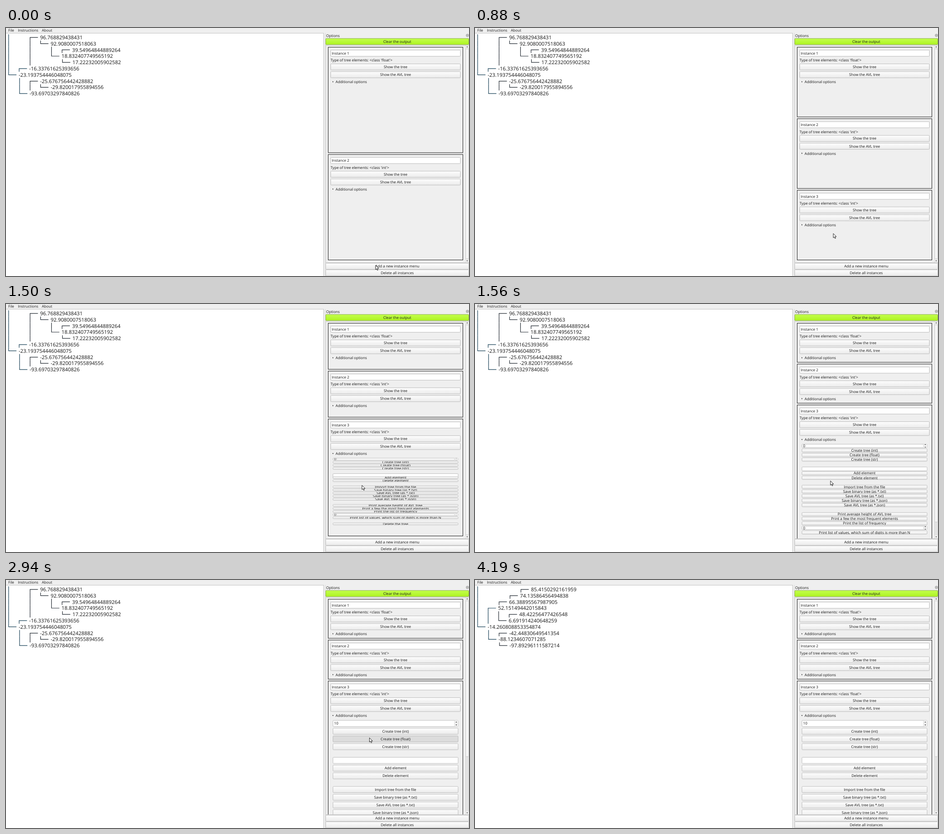
Recreate the animation shown at these times as an HTML page with a canvas. Size 1021x549 px, loop 4.25 s.

```html
<!DOCTYPE html>
<html lang="en">
<head>
<meta charset="utf-8">
<title>Tree builder</title>
<style>
html, body { margin: 0; width: 100%; height: 100%; overflow: hidden; background: #efefef; }
canvas { display: block; }
</style>
</head>
<body>
<canvas id="stage" width="1021" height="549"></canvas>
<script>
const ctx = document.getElementById('stage').getContext('2d');
const LOOP = 4250;
const FACE = '"Open Sans", "Noto Sans", sans-serif';
const BG = '#efefef', INK = '#161616', EDGE = '#b6b6b6';

const TICKS = [0, 250, 440, 500, 560, 630, 690, 750, 810, 870, 940, 1000, 1060,
  1310, 1380, 1440, 1500, 1560, 1630, 1690, 2940, 3380, 3810, 4190];

// Pointer positions: time, x, y
const PATH = [[0, 814.5, 525], [440, 814.5, 525], [750, 796, 466], [1060, 779.5, 436.5],
  [1310, 779.5, 436.5], [1380, 782, 429], [1500, 784.5, 401], [1690, 781, 370],
  [2940, 801, 349], [3380, 294, 83.5], [3810, 58, -3.5], [4190, 58, -20]];

const FIRST_TREE = [
  '│ ┌96.768829438431',
  '│ │└92.9080007518063',
  '│ │ │┌39.54964844889264',
  '│ │ └18.832407749565192',
  '│ │  └17.22232005902582',
  '│┌-16.33761625393656',
  '└-23.193754446048075',
  ' │┌-25.676756442428882',
  ' ││└-29.820017955894556',
  ' └-93.69703297840826'];

const NEW_TREE = [
  '│   ┌85.4150292161959',
  '│  ┌74.13586456494838',
  '│ ┌66.38895567987905',
  '│┌52.15149442015843',
  '│││┌48.42256477426548',
  '││└6.691914240648259',
  '└-14.260808853354874',
  ' │┌-42.44830649541354',
  ' └-88.1234607071285',
  '  └-97.89296111587214'];

const OPTIONS = ['#spin', 'Create tree (int)', 'Create tree (float)', 'Create tree (str)', '',
  '#edit', 'Add element', 'Delete element', '',
  'Import tree from the file', 'Save binary tree (as *.txt)', 'Save AVL tree (as *.txt)',
  'Save binary tree (as *.json)', 'Save AVL tree (as *.json)', '',
  'Print average height of AVL tree', 'Print a few the most frequent elements',
  'Print the list of frequency', '#spin',
  'Print list of values, which sum of digits is more than N', '', 'Delete the tree'];

function rect(x, y, w, h, color) {
  ctx.fillStyle = color;
  ctx.fillRect(x, y, w, h);
}

function text(str, x, cy, align = 'left', size = 8.1) {
  ctx.font = `${size}px ${FACE}`;
  ctx.textAlign = align;
  ctx.fillStyle = INK;
  ctx.fillText(str, x, cy + size * 0.36);
}

function poly(points, fill, stroke) {
  ctx.beginPath();
  points.forEach(([x, y]) => ctx.lineTo(x, y));
  ctx.closePath();
  ctx.fillStyle = fill;
  ctx.fill();
  if (stroke) {
    ctx.strokeStyle = stroke;
    ctx.lineWidth = 0.9;
    ctx.stroke();
  }
}

function triangle(x, y, dx, dy) {
  const r = 1.6;
  poly([[x + dx * r, y + dy * r], [x - dx + dy * r, y - dy + dx * r],
    [x - dx - dy * r, y - dy - dx * r]], '#484848');
}

function clipped(x, y, w, h, paint) {
  ctx.save();
  ctx.beginPath();
  ctx.rect(x, y, w, h);
  ctx.clip();
  paint();
  ctx.restore();
}

function box(x, y, w, h, fill, edge = EDGE) {
  ctx.beginPath();
  ctx.roundRect(x, y, w, h, Math.min(1.5, h / 2));
  ctx.fillStyle = fill;
  ctx.fill();
  ctx.strokeStyle = edge;
  ctx.lineWidth = 0.9;
  ctx.stroke();
}

function button(label, x, cy, w, { h = 13.6, down = false, green = false } = {}) {
  const y = cy - h / 2;
  let fill = '#dcdcdc';
  if (!down) {
    fill = ctx.createLinearGradient(0, y, 0, y + h);
    fill.addColorStop(0, green ? '#c3ff4c' : '#fdfdfd');
    fill.addColorStop(1, green ? '#aef322' : '#ebebeb');
  }
  box(x, y, w, h, fill, green ? '#83a83c' : EDGE);
  clipped(x, y, w, h, () => text(label, x + w / 2, cy, 'center'));
}

function drawTree(rows) {
  const pitch = 13.82;
  ctx.lineWidth = 1.2;
  rows.forEach((row, i) => {
    const cy = 20.8 + i * pitch, top = cy - pitch / 2, bottom = cy + pitch / 2;
    let x = 5.8;
    for (const [k, c] of [...row].entries()) {
      if (!'│┌└ '.includes(c)) {
        text(row.slice(k), x - 1.9, cy, 'left', 11.35);
        break;
      }
      ctx.strokeStyle = k < 2 ? '#163f55' : '#202830';
      ctx.beginPath();
      if (c === '│') {
        ctx.moveTo(x, top);
        ctx.lineTo(x, bottom);
      } else if (c !== ' ') {
        ctx.moveTo(x, c === '┌' ? bottom : top);
        ctx.lineTo(x, cy);
        ctx.lineTo(x + 17.3, cy);
      }
      ctx.stroke();
      x += c === ' ' ? 24.1 : c === '│' ? 23.2 : 24;
    }
  });
}

function drawSpin(cy, h, value) {
  const y = cy - h / 2;
  box(721, y, 276, h, '#fff');
  clipped(721, y, 276, h, () => {
    rect(989, y, 7.6, h, '#f3f3f3');
    rect(988.6, y, 0.8, h, '#cfcfcf');
    text(value, 723.5, cy);
    triangle(993, cy - 3, 0, -1);
    triangle(993, cy + 3.2, 0, 1);
  });
}

function drawOptions(t, top) {
  const pitch = Math.min(17.15, 6.83 + (t - 1500) * 0.0543);
  if (pitch < 0) return;
  if (pitch < 1) {
    clipped(720, 449, 278, 11.5, () => box(721, 450, 276, 14, '#fff'));
    return;
  }
  const h = Math.max(1.2, Math.min(13.6, pitch - 2.6));
  let cy = top + 85 + pitch / 2;
  for (const name of OPTIONS) {
    if (name === '#spin') {
      drawSpin(cy, h, t >= 2940 && cy < 400 ? '10' : '0');
    } else if (name === '#edit') {
      box(721, cy - h / 2, 276, Math.max(8.5, h), '#fff');
    } else if (name) {
      const down = name.includes('float') && t >= 2940 && t < 3380;
      button(name, 721, cy, 276, { h, down });
    }
    cy += name ? pitch : Math.min(13.1, pitch);
  }
}

function drawGroup(n, top, h, t) {
  const open = n === 3 && t >= 1310;
  const type = n === 1 || (n === 3 && t >= 3380) ? 'float' : 'int';
  ctx.strokeStyle = '#1c1c1c';
  ctx.lineWidth = 1;
  ctx.strokeRect(710.5, top - 0.5, 297, h);
  box(716, top + 6, 286, 13.6, '#fff');
  text('Instance ' + n, 718.3, top + 13);
  text(`Type of tree elements: <class '${type}'>`, 715.8, top + 28.3);
  button('Show the tree', 716, top + 43.2, 286);
  button('Show the AVL tree', 716, top + 60.4, 286);
  triangle(721, top + 76, open ? 0 : 1, open ? 1 : 0);
  text('Additional options', 726.8, top + 76.4);
  if (open) drawOptions(t, top);
}

function drawList(t) {
  const count = t < 440 ? 2 : 3;
  const even = (471 - 4 * (count - 1)) / count;
  const last = t < 1310 ? even : Math.max(even, 259 + Math.min(t - 1500, 190) * 1.026);
  const other = count === 2 ? even : Math.max(86.5, (463 - last) / 2);
  const total = (count - 1) * (other + 4) + last;

  ctx.strokeStyle = '#c4c4c4';
  ctx.lineWidth = 0.9;
  ctx.strokeRect(705, 38.5, 315.5, 481);
  clipped(705, 39, 308, 480, () => {
    for (let n = 1; n <= count; n++) {
      drawGroup(n, 43 + (n - 1) * (other + 4), n === count ? last : other, t);
    }
  });

  rect(1013, 39, 7.5, 480, '#e4e4e4');
  rect(1013, 39, 0.7, 480, '#c8c8c8');
  rect(1013.7, 39, 6.8, 6.5, '#f3f3f3');
  rect(1013.7, 512, 6.8, 7, '#f3f3f3');
  box(1013.7, 46, 6.6, 465 * Math.min(1, 471 / total), '#f6f6f6', '#c4c4c4');
  triangle(1017, 41.8, 0, -1);
  triangle(1017, 515.5, 0, 1);
}

function drawPointer(t) {
  const i = Math.max(1, PATH.findIndex(p => p[0] >= t));
  const [t0, x0, y0] = PATH[i - 1], [t1, x1, y1] = PATH[i];
  const k = (t - t0) / (t1 - t0);
  const x = x0 + (x1 - x0) * k, y = y0 + (y1 - y0) * k;
  if (t === 1380) {
    rect(x - 0.4, y - 5, 0.9, 10, '#777');
    rect(x - 2, y - 5.4, 4, 0.8, '#888');
    rect(x - 2, y + 4.6, 4, 0.8, '#888');
    return;
  }
  const arrow = [[0, 0], [0, 9.6], [2.2, 7.6], [3.8, 11.1], [5.3, 10.4], [3.8, 7], [6.8, 7]];
  poly(arrow.map(([dx, dy]) => [x + 0.5 + dx, y + 0.3 + dy]), '#fff', '#111');
}

function draw(t) {
  rect(0, 0, 1021, 549, BG);
  text('File', 5, 5);
  text('Instructions', 26.3, 5);
  text('About', 79, 5);

  rect(0, 11, 701, 538, '#c2c2c2');
  rect(0, 12, 700, 537, '#fff');
  clipped(0, 13.8, 700, 535, () => drawTree(t < 3380 ? FIRST_TREE : NEW_TREE));

  rect(704, 11, 0.8, 538, '#d2d2d2');
  text('Options', 706, 16.6);
  box(1015, 13.8, 5, 5, '#f4f4f4', '#777');
  ctx.beginPath();
  ctx.moveTo(1016, 14.8);
  ctx.lineTo(1019, 17.8);
  ctx.moveTo(1019, 14.8);
  ctx.lineTo(1016, 17.8);
  ctx.stroke();

  button('Clear the output', 705, 30, 315.5, { green: true });
  drawList(t);
  button('Add a new instance menu', 705, 527.4, 315.5, { down: t >= 250 && t < 440 });
  button('Delete all instances', 705, 542, 315.5);
  drawPointer(t);
}

function frame(now) {
  const t = now % LOOP;
  draw(TICKS.findLast(k => k <= t) ?? 0);
  requestAnimationFrame(frame);
}

ctx.textRendering = 'geometricPrecision';
frame(0);
</script>
</body>
</html>
```
